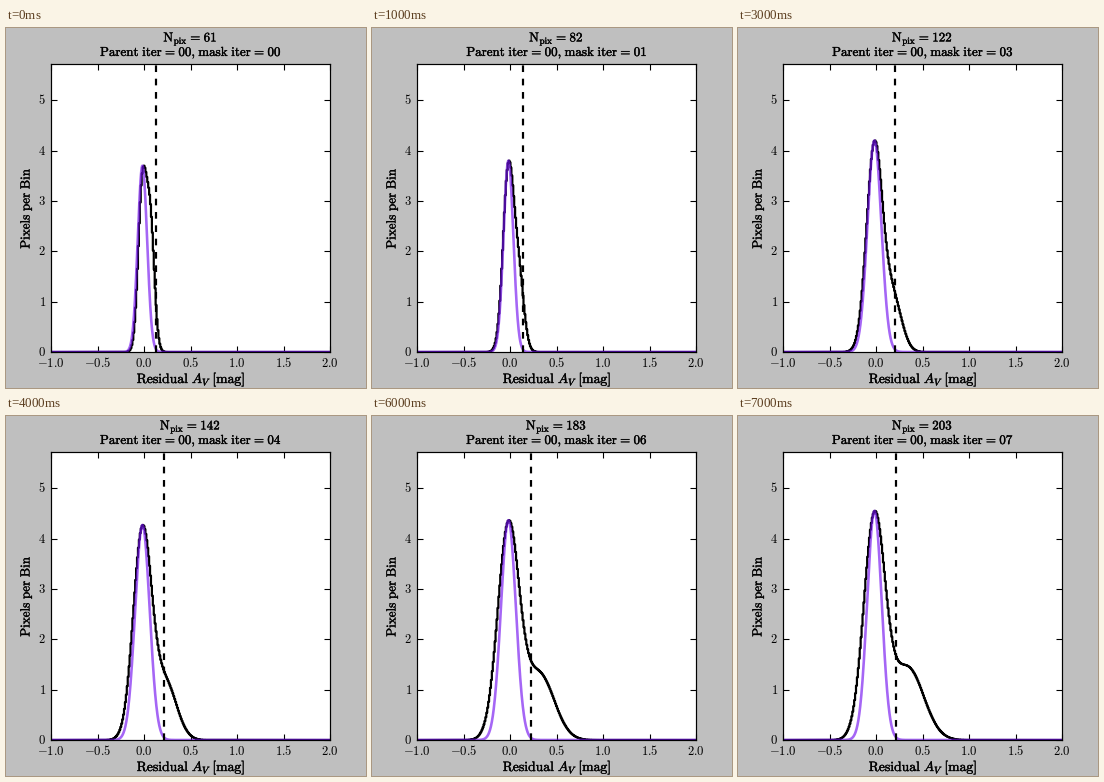
Write a matplotlib script that moves like this. It is 360 px wide and 360 px high and loops after 8000 ms.

```python
import numpy as np
import matplotlib.pyplot as plt
from matplotlib.animation import FuncAnimation
from matplotlib.patheffects import withStroke

SIZE = 360
STEPS = 8
TOP = 5.72
MEAN = -0.017
PURPLE = "#7514f0"

plt.rcParams["mathtext.fontset"] = "cm"
plt.rcParams["toolbar"] = "None"


def gauss(x, height, mean, sigma):
    return height * np.exp(-0.5 * ((x - mean) / sigma) ** 2)


def histogram(x, i):
    """Narrow core plus a second bump that drifts right and spreads."""
    t = i / (STEPS - 1)
    ease = t - np.sin(2 * np.pi * t) / 16
    core = min(0.045 + 0.0135 * i, 0.115)
    height = 0.95 + 1.55 * np.exp(-1.2 * i) + 0.01 * i ** 2
    bump = (height, 0.07 + 0.27 * ease, 0.043 + 0.13 * ease)
    peak = np.interp(i, [0, 1, 2, 4, 5, 7], [3.7, 3.8, 4.13, 4.27, 4.18, 4.55])
    y = gauss(x, peak - gauss(MEAN, *bump), MEAN, core) + gauss(x, *bump)
    return y * peak / y.max()


def threshold(i):
    return np.interp(i, [0, 1, 2, 5, 7], [0.134, 0.142, 0.196, 0.228, 0.217])


def roman(s):
    """Upright math text with ordinary word spaces."""
    thin, wide = r"\hspace{0.09}", r"\hspace{0.32}"
    s = s.replace(" = ", thin + "=" + thin)
    s = s.replace(", ", "," + thin).replace(" ", wide)
    return r"$\mathrm{" + s + "}$"


def label(x, y, s, size, bold=0.35, **kw):
    opts = dict(ha="center", va="baseline")
    opts.update(kw)
    if bold:
        opts["path_effects"] = [withStroke(linewidth=bold, foreground="black")]
    return fig.text(x / SIZE, 1 - y / SIZE, s, fontsize=size, **opts)


# At 72 dpi one point is one pixel
fig = plt.figure(figsize=(SIZE / 72, SIZE / 72), dpi=72, facecolor="#bfbfbf")
ax = fig.add_axes([0.125, 0.1, 0.775, 0.8])
ax.set_xlim(-1, 2)
ax.set_ylim(0, TOP)
ax.set_xticks(np.arange(-1, 2.1, 0.5))
ax.set_yticks(range(6))
ax.tick_params(direction="in", top=True, right=True, length=6, width=1.1,
               labelbottom=False, labelleft=False)
for spine in ax.spines.values():
    spine.set_linewidth(1.2)

for v in ax.get_xticks():
    label(45 + 93 * (v + 1), 339, f"${v:.1f}$", 12.6, bold=0)
for v in range(6):
    label(40, 328 - 50.35 * v, f"${v}$", 12.6, bold=0, ha="right")
label(185, 355, roman(r"Residual \mathit{A_V} [mag]"), 13.7)
label(20, 180, roman("Pixels per Bin"), 13.1, rotation=90, va="center")
count_text = label(184.5, 13.5, "", 13)
iter_text = label(185, 28, "", 13)

bins = np.arange(-1, 2.005, 0.01)
fine = np.linspace(-1, 2, 1201)
hist, = ax.plot([], [], color="black", lw=2.2, drawstyle="steps-mid",
                snap=False)
fit, = ax.plot([], [], color=PURPLE, lw=2.6, alpha=0.65)
cut, = ax.plot([], [], color="black", lw=2.2, ls=(0, (3.03, 3.03)),
               dash_capstyle="butt")


def draw(i):
    y = histogram(bins, i)
    limit = threshold(i)
    hist.set_data(bins, y)
    # The cut sits three sigma above the fitted mean
    fit.set_data(fine, gauss(fine, y.max(), MEAN, (limit - MEAN) / 3))
    cut.set_data([limit, limit], [0, TOP])
    count = round(61.3 + 20.27 * i)
    count_text.set_text(roman(f"N_{{pix}} = {count}"))
    iter_text.set_text(roman(f"Parent iter = 00, mask iter = {i:02d}"))
    return hist, fit, cut, count_text, iter_text


anim = FuncAnimation(fig, draw, frames=STEPS, interval=1000, repeat=True,
                     repeat_delay=0, blit=False)
plt.show()
```
